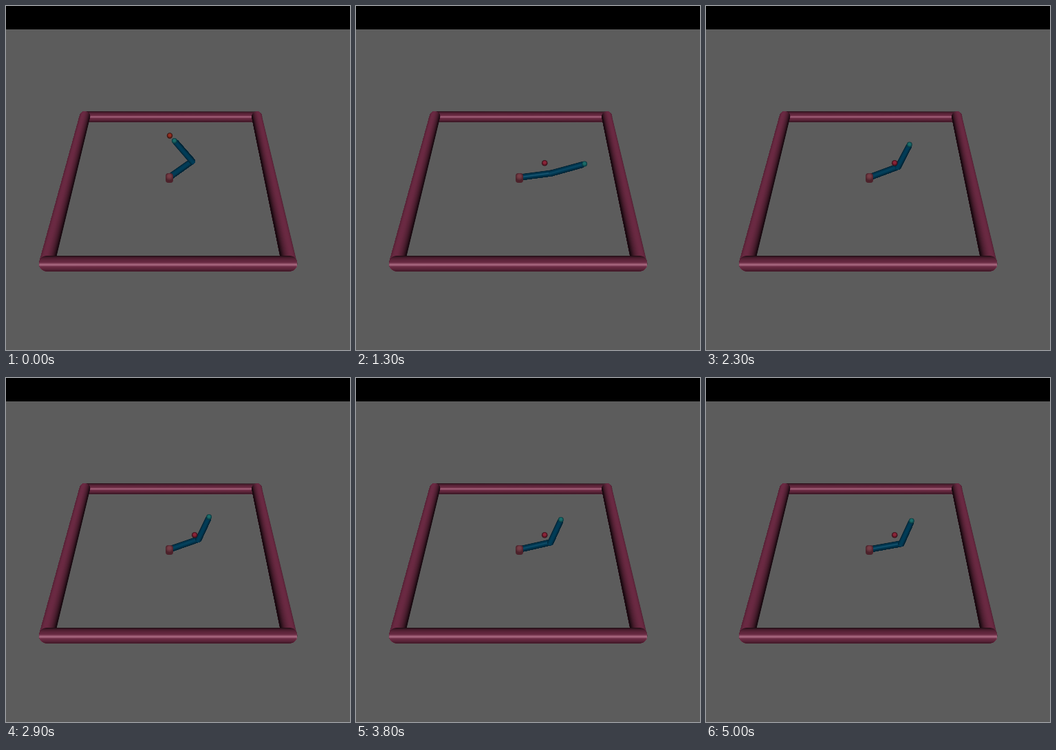
Write an HTML page with a canvas that moves like this. It is 500 by 500 pixels and loops after 5100 ms.

```html
<!DOCTYPE html>
<html>
<head>
<meta charset="utf-8">
<style>
  html, body { margin: 0; width: 100%; height: 100%; overflow: hidden; background: #000; }
  canvas { display: block; }
</style>
</head>
<body>
<canvas id="stage" width="500" height="500"></canvas>
<script>
const ctx = document.getElementById('stage').getContext('2d');
const LOOP = 5100, STEP = 100;
const PINK = [126, 50, 79], BLUE = [2, 72, 104];
const rad = deg => deg * Math.PI / 180;

function ball(x, y, r, light, dark) {
  const g = ctx.createRadialGradient(x, y - r * .2, r * .4, x, y, r);
  g.addColorStop(0, light);
  g.addColorStop(1, dark);
  ctx.fillStyle = g;
  ctx.beginPath();
  ctx.arc(x, y, r, 0, 7);
  ctx.fill();
}

// Colour at s (-1..1) across a round tube lit from side `light`
function shade(base, s, light, gloss) {
  const lit = Math.max(0, Math.cos(Math.asin(s) - Math.asin(light)));
  const shine = gloss * Math.exp(-(((s - light) / .17) ** 2));
  return `rgb(${base.map(c => Math.round(c * (.2 + .65 * lit) + shine))})`;
}

// Tapered tube with round ends, painted in strips along its length
function tube([x1, y1, r1], [x2, y2, r2], base, light = 0, gloss = 0) {
  const angle = Math.atan2(y2 - y1, x2 - x1);
  const length = Math.hypot(x2 - x1, y2 - y1), strips = 24;
  ctx.save();
  ctx.translate(x1, y1);
  ctx.rotate(angle);
  ctx.beginPath();
  ctx.arc(0, 0, r1, Math.PI / 2, -Math.PI / 2);
  ctx.arc(length, 0, r2, -Math.PI / 2, Math.PI / 2);
  ctx.clip();
  const grow = (r2 - r1) / length;
  const left = r1 - grow * r1, right = r2 + grow * r2;
  for (let i = 0; i < strips; i++) {
    const s = 2 * i / strips - 1;
    ctx.fillStyle = shade(base, s + 1 / strips, light, gloss);
    ctx.beginPath();
    ctx.moveTo(-r1, left * s);
    ctx.lineTo(length + r2, right * s);
    ctx.lineTo(length + r2, right + 1);
    ctx.lineTo(-r1, left + 1);
    ctx.fill();
  }
  ctx.restore();
}

function drawArena() {
  ctx.fillStyle = '#000';
  ctx.fillRect(0, 0, 500, 34);
  ctx.fillStyle = '#5c5c5c';
  ctx.fillRect(0, 34, 500, 466);
  const backLeft = [114.7, 160.8, 7.7], backRight = [364.7, 160.8, 7.5];
  const frontLeft = [59.5, 374.3, 11.3], frontRight = [412, 374.3, 11.2];
  tube(backLeft, backRight, PINK, .05, 55);
  tube(backLeft, frontLeft, PINK, .5);
  tube(backRight, frontRight, PINK, -.5);
  tube(frontLeft, frontRight, PINK, .15, 62);
}

// Perspective view of a point on the table
function project(x, y, radius) {
  const depth = 1 + .563 * y;
  return [237 + 489 * x / depth, -367 + 616 / depth, radius / depth];
}

function link(from, to) {
  const across = Math.abs(to[0] - from[0]) / Math.hypot(to[0] - from[0], to[1] - from[1]);
  tube(from, to, BLUE, 0, 40 * across ** 30);
}

function drawArm(shoulder, forearm) {
  const a = rad(shoulder), b = rad(forearm);
  const reach = d => project(.1 * Math.cos(a) + d * Math.cos(b), .1 * Math.sin(a) + d * Math.sin(b), 4.6);
  link(project(0, 0, 4.6), reach(0));
  link(reach(0), reach(.1));
  const [x, y] = reach(.11);
  ball(x, y, 4, '#1a6c6a', '#08343a');
  ctx.fillStyle = '#4c222b';
  ctx.beginPath();
  ctx.roundRect(232, 243, 11, 14, 4);
  ctx.fill();
  ball(237.5, 248, 5, '#743c44', '#542832');
}

// Smooth switch from 0 to 1 around `mid`
const ease = (t, mid, width) => 1 / (1 + Math.exp((mid - t) / width));

function draw(t) {
  drawArena();
  if (t < STEP) {
    drawArm(45, 119);
    ball(238, 188.5, 4.2, '#943022', '#300e0c');
  } else {
    const swing = ease(t, 1450, 230);
    drawArm(1 + 28 * swing - 14.8 * ease(t, 3400, 350), -4 + 73.5 * swing);
    ball(274.2, 228.3, 4.3, '#8c2438', '#300a14');
  }
}

let shown = -1;
function tick() {
  const t = Math.floor(performance.now() % LOOP / STEP) * STEP;
  if (t !== shown) draw(shown = t);
  requestAnimationFrame(tick);
}
tick();
</script>
</body>
</html>
```
